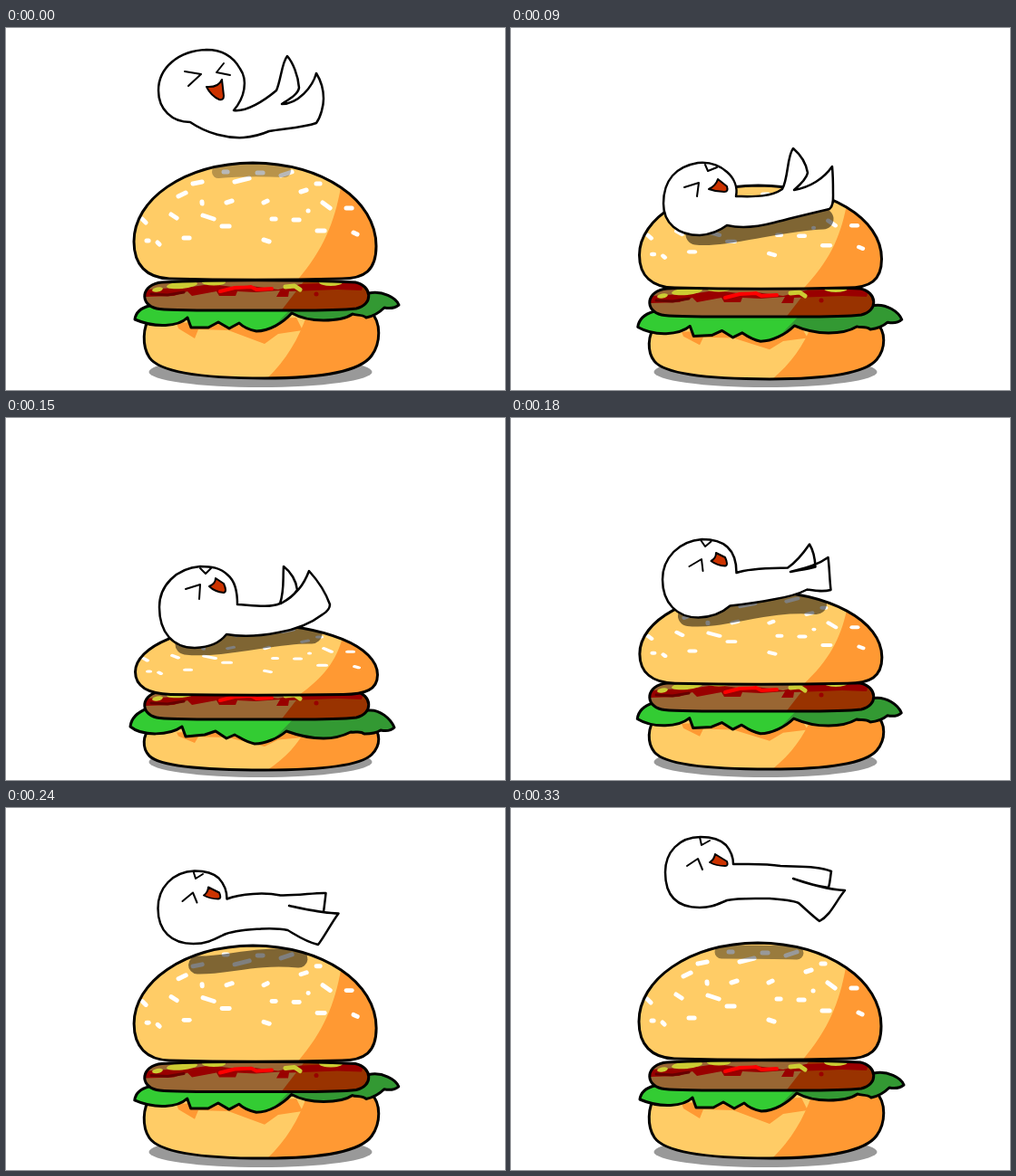
An HTML page with a canvas for the animation above (0.36 s loop, 550 by 400 pixels).

```html
<!DOCTYPE html>
<html lang="en">
<head>
<meta charset="utf-8">
<title>Burger bounce</title>
<style>
  html, body { margin: 0; width: 100%; height: 100%; overflow: hidden; background: #fff; }
  canvas { display: block; }
</style>
</head>
<body>
<canvas id="stage" width="550" height="400"></canvas>
<script>
const ctx = document.getElementById('stage').getContext('2d');
const STEP_MS = 30, STEPS = 12;
const BUN_TOP = 149, BUN_BOTTOM = 278;

const sitting = {
  body: `M251,91 C263,77 267,58 258,45 C249,29 234,24 221,24 C190,25 168,44 168,69
    C168,90 183,104 203,104 C222,117 244,122 262,121 C275,120 283,117 290,114
    C308,111 328,110 342,105 C347,98 350,86 350,78 C350,69 347,58 342,50
    C338,65 322,84 304,84 C313,78 322,73 323,66 C322,52 316,38 310,31
    C304,38 303,58 298,69 C285,80 265,93 251,91Z`,
  eyes: 'M197,48 L215,51 L201,64 M240,39 L232,49 L247,52',
  mouth: 'M221,65 Q234,66 238,57 L240,75 Q240,80 235,79 Q226,75 221,65Z'
};
const landed = {
  body: `M248,186 C250,176 246,166 238,159 C228,150 216,148 206,149 C182,153 168,168 168,194
    C168,216 184,229 208,229 C222,228 230,224 238,218 C255,222 275,219 290,215
    C305,211 330,205 351,200 C356,196 355,188 355,182 C355,172 355,164 354,153
    C345,166 330,176 312,179 C320,172 326,166 327,160 C325,148 318,139 311,133
    C304,142 306,165 299,178 C285,188 262,186 248,186Z`,
  eyes: 'M191,176 L207,171 L205,186 M214,151 L217,158 L227,154',
  mouth: 'M218,178 Q226,174 228,167 L238,175 Q240,181 235,181 Q226,181 218,178Z'
};
const sunk = {
  body: `M255,206 C255,192 252,180 245,174 C236,165 226,164 214,164 C188,166 169,185 169,209
    C169,237 184,254 208,254 C225,253 235,249 243,239 C265,243 285,240 300,237
    C318,234 336,227 349,217 C354,214 357,211 357,206 C352,192 344,180 334,169
    C328,185 320,195 303,205 C312,200 318,195 321,190 C320,180 314,170 306,164
    C305,178 307,190 302,205 C290,210 272,207 255,206Z`,
  eyes: 'M198,189 L214,184 L213,200 M214,166 L220,172 L226,166',
  mouth: 'M224,186 Q231,183 231,177 L240,183 Q244,192 240,193 Q230,192 224,186Z'
};
const rising = {
  body: `M242,136 C242,126 238,117 232,111 C226,106 216,104 207,104 C182,106 165,124 165,148
    C165,172 182,187 205,187 C220,187 230,182 240,176 C252,168 266,166 278,164
    C290,162 298,162 304,162 C318,168 330,174 348,174 C350,162 358,150 365,139
    C348,140 330,136 313,135 C325,136 340,138 350,139 C350,130 352,122 352,115
    C340,120 325,126 308,126 C290,122 255,124 242,136Z`,
  eyes: 'M195,139 L206,128 L210,138 M205,105 L208,112 L215,107',
  mouth: 'M217,130 Q221,127 221,121 L232,125 Q236,133 232,134 Q224,134 217,130Z'
};
const floating = {
  body: `M245,65 C245,58 242,50 237,44 C230,37 219,35 209,35 C185,35 170,52 170,74
    C170,100 183,113 208,113 C222,113 228,109 238,105 C250,102 270,103 285,103
    C300,104 310,105 317,108 C325,115 332,122 340,128 C352,122 358,106 368,94
    C348,93 330,87 311,81 C325,86 340,90 350,91 C352,84 352,78 353,73
    C340,67 318,68 297,67 C280,64 262,65 245,65Z`,
  eyes: 'M194,67 L206,59 L211,71 M208,35 L210,44 L219,39',
  mouth: 'M219,63 Q224,60 225,54 L238,62 Q240,67 236,67 Q226,67 219,63Z'
};

// sag: lettuce and lower bun; drop: patty; cast: the shadow on the upper bun
const keys = [
  { step: 0, pose: sitting, x: 0, y: 0, top: 149, bottom: 278, drop: 0, sag: 0,
    cast: 'M234,159 C255,157 285,157 307,158', castWidth: 14, dark: .28 },
  { step: 2, pose: sitting, x: 4, y: 56, top: 149, bottom: 278, drop: 0, sag: .2,
    cast: 'M213,166 C230,182 300,183 333,168', castWidth: 23, dark: .5 },
  { step: 3, pose: landed, x: 0, y: 0, top: 174, bottom: 288, drop: 7, sag: .45,
    cast: 'M204,228 C235,232 300,212 344,211', castWidth: 23, dark: .5 },
  { step: 5, pose: sunk, x: 0, y: 0, top: 228, bottom: 306, drop: 21, sag: 1,
    cast: 'M198,250 C240,255 300,236 337,238', castWidth: 23, dark: .5 },
  { step: 7, pose: rising, x: 0, y: 0, top: 155, bottom: 282, drop: 3, sag: .1,
    cast: 'M193,187 C230,190 260,165 336,173', castWidth: 23, dark: .5 },
  { step: 9, pose: floating, x: 0, y: 0, top: 149, bottom: 278, drop: 0, sag: 0,
    cast: 'M229,160 C255,159 285,159 309,160', castWidth: 17, dark: .5 },
  { step: 11, pose: floating, x: 0, y: -3, top: 149, bottom: 278, drop: 0, sag: 0,
    cast: 'M232,159 C255,159 285,159 315,160', castWidth: 15, dark: .4 }
];

const upperBun = new Path2D(`M141,236 C141,190 195,150 272,149 C350,150 408,190 408,241
  C408,268 395,277 370,277 C300,279 250,279 180,277 C155,276 141,262 141,236Z`);
const upperShade = new Path2D('M369,176 C362,215 350,245 320,280 L420,290 L420,170Z');
const lowerBun = new Path2D(`M160,318 C150,330 150,352 158,364 C170,382 225,387 285,387
  C345,387 390,380 403,362 C413,348 414,325 402,314`);
const lowerShade = new Path2D('M332,316 C322,345 308,368 286,389 L420,392 L420,300Z');
const lettuceShade = new Path2D(
  'M188,326 L190,332 L208,343 L212,333 L245,334 L285,349 L300,338 L327,334 L320,320Z');
const patty = new Path2D(`M172,281 C148,283 147,306 166,310 C180,313 250,312 280,312
  C320,312 360,313 386,310 C405,306 404,285 385,281 C320,278 230,278 172,281Z`);
const pattyShade = new Path2D('M336,270 L302,314 L410,320 L410,270Z');
const ketchup = new Path2D(`M154,289 L205,286 L225,283 L250,286 L270,285 L300,289 L325,283
  L350,282 L395,280 L392,290 L365,289 L340,290 L312,291 L311,297 L298,297 L302,290
  L275,292 L255,291 L253,296 L235,296 L232,291 L205,296 L200,291 L185,296 L154,297Z`);

const lettuceRest = `M400,293 C415,290 430,298 433,306 C428,310 422,310 417,309
  C410,316 402,319 397,320 C392,316 386,318 382,316 C375,321 362,323 350,323
  C335,323 322,319 315,315 C305,326 290,335 276,335 C266,333 260,329 257,326
  L246,332 L234,325 L223,331 L204,331 L200,320 C190,330 165,332 142,322
  C143,314 150,309 158,307Z`;
const lettuceSagged = `M400,323 C412,322 424,332 428,342 C424,346 418,346 413,345
  C407,349 400,349 395,349 C390,345 385,348 380,347 C372,351 362,354 350,354
  C335,354 320,350 309,346 C300,354 285,360 274,360 C264,358 258,353 252,350
  L243,354 L231,346 L219,350 L198,352 L194,341 C180,351 150,352 137,341
  C138,332 145,325 156,321Z`;

// centre and half extent of each seed
const seeds = [
  [211, 171, 5, -1], [194, 184, 4, -2], [260, 168, 8, -2], [309, 161, 6, -2],
  [344, 172, 2, 0], [328, 180, 3, -1], [286, 192, 2, -1], [246, 192, 3, -1],
  [216, 193, 0, 1], [185, 208, 3, 2], [223, 209, 6, 2], [242, 219, 4, 0],
  [295, 211, 2, 0], [320, 212, 3, 0], [333, 202, 0, 0], [353, 196, 4, 3],
  [378, 199, 3, 0], [152, 213, 2, 2], [156, 235, 1, 0], [168, 238, 1, 1],
  [199, 232, 3, 0], [287, 235, 3, 1], [347, 224, 4, 0], [385, 227, 2, 1],
  [242, 159, 2, 0], [280, 160, 3, 0]
];

const lerp = (a, b, u) => a + (b - a) * u;

function morph(from, to, u) {
  if (!u || from === to) return from;
  const ends = to.match(/[\d.]+/g);
  let i = 0;
  return from.replace(/[\d.]+/g, n => lerp(+n, +ends[i++], u));
}

function blend(a, b, u) {
  if (typeof a === 'number') return lerp(a, b, u);
  if (typeof a === 'string') return morph(a, b, u);
  return Object.fromEntries(Object.keys(a).map(k => [k, blend(a[k], b[k], u)]));
}

function stateAt(step) {
  const i = keys.findLastIndex(k => k.step <= step);
  const a = keys[i], b = keys[i + 1] || a;
  return a === b ? a : blend(a, b, (step - a.step) / (b.step - a.step));
}

function fill(path, color) {
  ctx.fillStyle = color;
  ctx.fill(path);
}

function stroke(path, width, color = '#000') {
  ctx.lineWidth = width;
  ctx.strokeStyle = color;
  ctx.stroke(path);
}

function placed(path, matrix) {
  const p = new Path2D();
  p.addPath(path, matrix);
  return p;
}

// Paints details inside a shape, then its outline at constant weight.
function layer(path, matrix, color, details, after) {
  const shape = placed(path, matrix);
  ctx.save();
  fill(shape, color);
  ctx.clip(shape);
  ctx.save();
  ctx.transform(matrix.a, matrix.b, matrix.c, matrix.d, matrix.e, matrix.f);
  details();
  ctx.restore();
  if (after) after();
  ctx.restore();
  stroke(shape, 3);
}

function squash(y0, y1, to0, to1, dx = 0) {
  const s = (to1 - to0) / (y1 - y0);
  return new DOMMatrix([1, 0, 0, s, dx, to0 - y0 * s]);
}

const shift = (x, y) => new DOMMatrix([1, 0, 0, 1, x, y]);

function blob(x, y, rx, ry, color, tilt = 0) {
  ctx.fillStyle = color;
  ctx.beginPath();
  ctx.ellipse(x, y, rx, ry, tilt, 0, 7);
  ctx.fill();
}

function drawLowerBun(s) {
  blob(280.5, 380, 123, 17, '#999');
  layer(lowerBun, squash(318, 387, lerp(318, 342, s.sag), lerp(387, 389, s.sag)), '#fc6', () => {
    fill(lettuceShade, '#f93');
    fill(lowerShade, '#f93');
  });
}

function drawLettuce(s) {
  const leaf = new Path2D(morph(lettuceRest, lettuceSagged, s.sag));
  layer(leaf, shift(0, 0), '#3c3', () => {
    ctx.translate(0, 25 * s.sag);
    fill(new Path2D('M326,298 L288,337 L440,345 L440,270Z'), '#393');
  });
}

function drawPatty(s) {
  layer(patty, shift(0, s.drop), '#963', () => {
    fill(pattyShade, '#930');
    fill(ketchup, '#900');
    stroke(new Path2D('M160,294 L178,295 L196,292'), 3, '#600');
    stroke(new Path2D('M236,291 L252,287 L270,286 L276,289 L293,288'), 4, '#f00');
    blob(342, 294, 2.5, 2.5, '#900');
    blob(194, 284, 17, 4, '#cc3', -.1);
    blob(167, 289, 6, 2.5, '#cc3', -.2);
    blob(229, 281, 13, 3.5, '#cc3');
    blob(262, 282, 14, 2.5, '#963');
    blob(358, 281, 13, 4, '#cc3');
    stroke(new Path2D('M308,286 L318,285 L324,289'), 5, '#cc3');
  });
}

function drawUpperBun(s) {
  const matrix = squash(BUN_TOP, BUN_BOTTOM, s.top, s.bottom, s.drop / 14);
  layer(upperBun, matrix, '#fc6', () => {
    fill(upperShade, '#f93');
    for (const [x, y, dx, dy] of seeds) {
      stroke(new Path2D(`M${x - dx},${y - dy} L${x + dx + .1},${y + dy}`), 5, '#fff');
    }
  }, () => stroke(new Path2D(s.cast), s.castWidth, `rgba(0,0,0,${s.dark})`));
}

function drawFigure({ pose, x, y }) {
  ctx.save();
  ctx.translate(x, y);
  const body = new Path2D(pose.body), mouth = new Path2D(pose.mouth);
  fill(body, '#fff');
  stroke(body, 2.5);
  stroke(new Path2D(pose.eyes), 2);
  fill(mouth, '#c30');
  stroke(mouth, 2);
  ctx.restore();
}

function draw(now) {
  const s = stateAt(Math.floor(now / STEP_MS) % STEPS);
  ctx.fillStyle = '#fff';
  ctx.fillRect(0, 0, 550, 400);
  drawLowerBun(s);
  drawLettuce(s);
  drawPatty(s);
  drawUpperBun(s);
  drawFigure(s);
}

ctx.lineCap = ctx.lineJoin = 'round';
const start = performance.now();
function tick() {
  draw(performance.now() - start);
  requestAnimationFrame(tick);
}
tick();
</script>
</body>
</html>
```
